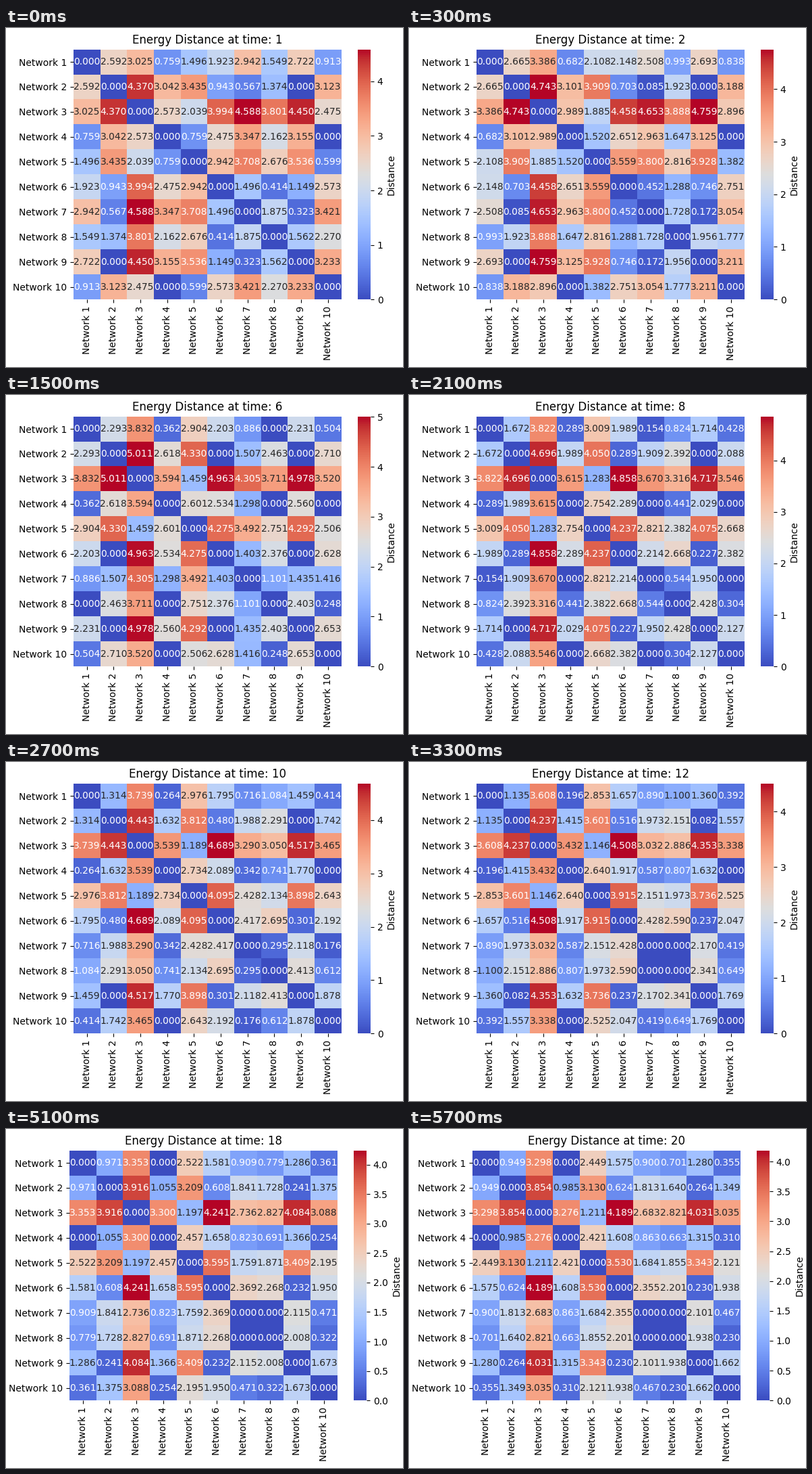
Animation of 588x501 px, one loop 6 s. Source, as a matplotlib script:

```python
import math

import numpy as np
import matplotlib.pyplot as plt
from matplotlib.animation import FuncAnimation

W, H, DPI = 588, 501, 100
N, FRAMES, INTERVAL = 10, 20, 300
LEFT, BOTTOM, MAP_W, MAP_H = 99.84, 99.84, 396.8, 369.6
BAR_X, BAR_W = 421.6, 18.48
BIAS = 0.05

plt.rcParams["font.family"] = "DejaVu Sans"

# Each network is a normal cloud whose centre drifts along a line.
# Centres are measured from network 3; all clouds share one spread.
TIMES = [1, 4, 8, 12, 20]
SPREAD = [3.2, 5.1, 5.7, 5.6, 5.2]
CENTRES = {
    1: [12.4, 19.95, 20.35, 18.65, 16.1],
    2: [22.35, 32.45, 27.8, 23.6, 20.1],
    4: [9.85, 17.6, 18.8, 17.4, 15.95],
    5: [7.3, 7.0, 5.65, 5.0, 5.1],
    6: [19.2, 30.6, 29.35, 25.97, 22.8],
    7: [24.3, 27.55, 19.2, 14.75, 12.3],
    8: [17.7, 21.1, 16.7, 13.85, 13.1],
    9: [23.05, 31.8, 28.0, 24.6, 21.5],
    10: [9.35, 17.0, 18.3, 16.75, 14.4],
}


def glide(points, t):
    """Monotone cubic path through the key points, easing out at the end."""
    step, p = np.diff(TIMES), np.array(points)
    slope = np.diff(p) / step
    tang = [slope[0]]
    for a, b in zip(slope, slope[1:]):
        tang.append(2 * a * b / (a + b) if a * b > 0 else 0)
    tang.append(slope[-1] / 2)
    k = min(np.searchsorted(TIMES, t, side="right") - 1, len(step) - 1)
    h = step[k]
    u = (t - TIMES[k]) / h
    return ((1 + 2 * u) * (1 - u) ** 2 * p[k]
            + u * (1 - u) ** 2 * h * tang[k]
            + u * u * (3 - 2 * u) * p[k + 1]
            + u * u * (u - 1) * h * tang[k + 1])


erf = np.vectorize(math.erf)


def distances(t):
    """Energy distance between every pair of clouds."""
    x = np.zeros(N)
    for name, path in CENTRES.items():
        x[name - 1] = glide(path, t)
    c = glide(SPREAD, t)
    u = np.abs(x[:, None] - x) / c
    gap = u * erf(u / math.sqrt(math.pi)) + np.exp(-u * u / math.pi) - 1
    return np.sqrt(np.maximum(c * gap - BIAS, 0))


def luminance(rgba):
    c = rgba[..., :3]
    lin = np.where(c <= 0.03928, c / 12.92, ((c + 0.055) / 1.055) ** 2.4)
    return lin @ [0.2126, 0.7152, 0.0722]


def box(x, w):
    return [x / W, BOTTOM / H, w / W, MAP_H / H]


fig = plt.figure(figsize=(W / DPI, H / DPI), dpi=DPI, facecolor="white")
ax = fig.add_axes(box(LEFT, MAP_W))
cax = fig.add_axes(box(LEFT + BAR_X, BAR_W))

mesh = ax.pcolormesh(distances(1), cmap="coolwarm", vmin=0)
ax.set(xlim=(0, N), ylim=(N, 0))
mid = np.arange(N) + 0.5
names = [f"Network {i + 1}" for i in range(N)]
ax.set_xticks(mid, names, rotation="vertical")
ax.set_yticks(mid, names)
ax.spines[:].set_visible(False)
title = ax.set_title("")
labels = [[ax.text(x, y, "", ha="center", va="center") for x in mid]
          for y in mid]

bar = fig.colorbar(mesh, cax=cax, label="Distance")
bar.outline.set_linewidth(0)


def update(i):
    t = i + 1
    d = distances(t)
    top = d.max()
    # Half-step ticks widen the bar labels, which moves the plot left.
    left = LEFT - (6 if top < 4.5 else 0)
    ax.set_position(box(left, MAP_W))
    cax.set_position(box(left + BAR_X, BAR_W))
    mesh.set_array(d)
    mesh.set_clim(0, top)
    title.set_text(f"Energy Distance at time: {t}")
    light = luminance(mesh.to_rgba(d)) > 0.408
    for r, row in enumerate(labels):
        for c, label in enumerate(row):
            label.set_text(f"{d[r, c]:.3f}")
            label.set_color("0.15" if light[r, c] else "white")
    return []


anim = FuncAnimation(fig, update, frames=FRAMES, interval=INTERVAL,
                     init_func=lambda: update(0), repeat=True, repeat_delay=0)
plt.show()
```
